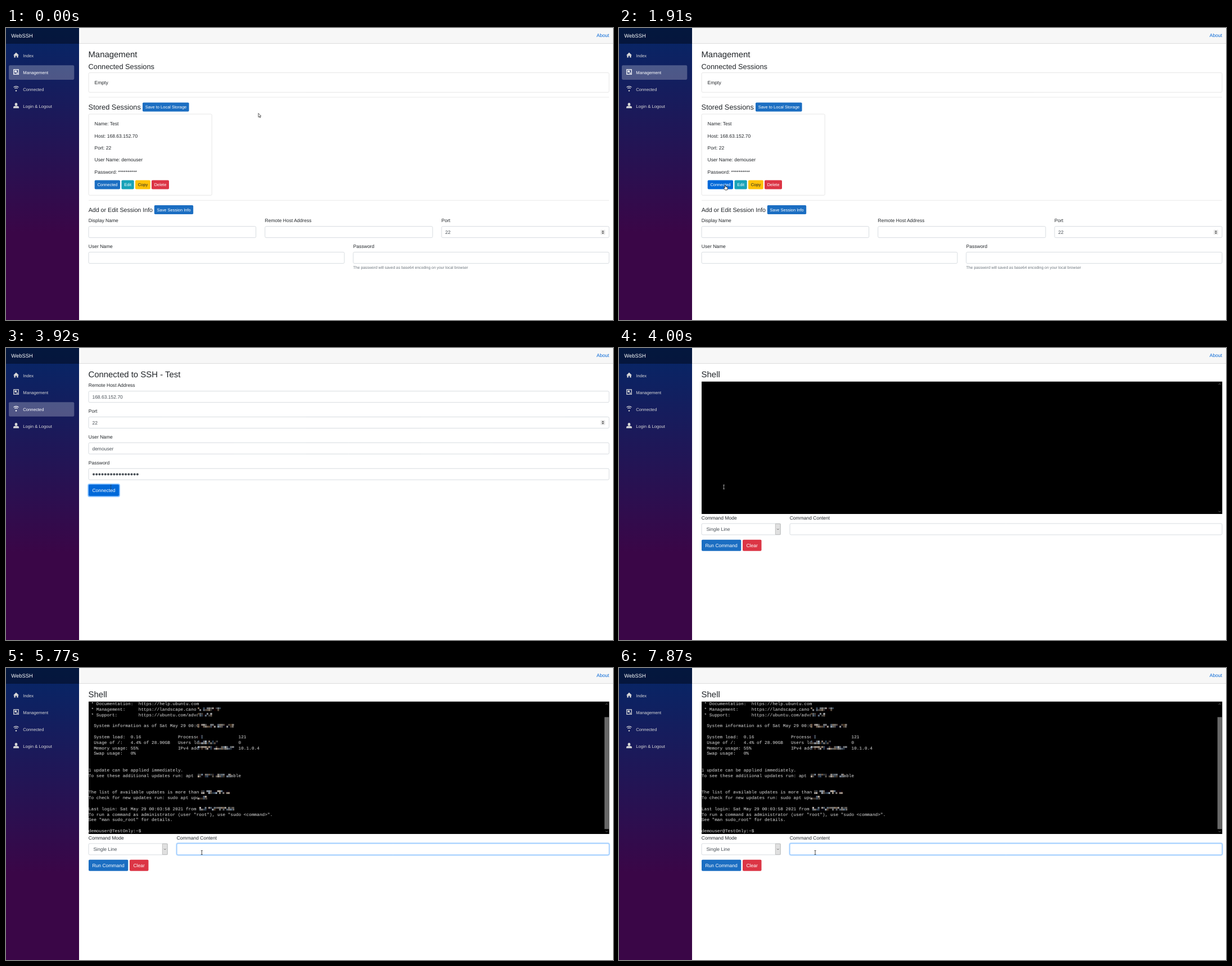
Recreate the animation shown at these times as an HTML page with a canvas. Size 1080 by 519 pixels, loop 8000 ms.

```html
<!DOCTYPE html>
<html lang="en">
<head>
<meta charset="utf-8">
<title>WebSSH</title>
<style>
html, body { margin: 0; width: 100%; height: 100%; overflow: hidden; background: #fff; }
canvas { display: block; width: 1080px; height: 519px; }
</style>
</head>
<body>
<canvas id="stage"></canvas>
<script>
const W = 1080, H = 519, LOOP = 8000;
const canvas = document.getElementById('stage');
const ratio = window.devicePixelRatio || 1;
canvas.width = W * ratio;
canvas.height = H * ratio;
const c = canvas.getContext('2d');
c.scale(ratio, ratio);
c.textRendering = 'geometricPrecision';

const SANS = '"Liberation Sans", Arial, sans-serif';
const MONO = '"Liberation Mono", "Courier New", monospace';
const BODY = 8.53, SMALL = 7.47, H3 = 14.93, H4 = 12.8, H5 = 10.67;
const INK = '#212529', FIELD = '#495057', BLUE = '#1b6ec2', HOVER = '#0069d9', RED = '#dc3545';
const LEFT = 147, RIGHT = 1073;

// Times at which the scene switches
const T = { form: 1980, press: 2760, beam: 3920, shell: 4000, output: 5080, focus: 5230 };

// Text is placed by the middle of its capitals
function text(s, x, y, size = BODY, color = INK, family = SANS) {
  c.font = `${size}px ${family}`;
  c.fillStyle = color;
  c.fillText(s, x, y + size * 0.358);
}

function rect(x, y, x2, y2, color) {
  c.fillStyle = color;
  c.fillRect(x, y, x2 - x, y2 - y);
}

function rounded(x, y, x2, y2, r, fill, stroke, width = 1) {
  c.beginPath();
  c.roundRect(x, y, x2 - x, y2 - y, r);
  if (fill) { c.fillStyle = fill; c.fill(); }
  if (stroke) { c.strokeStyle = stroke; c.lineWidth = width; c.stroke(); }
}

function poly(points, fill, stroke, width = 1) {
  c.beginPath();
  points.forEach(([x, y]) => c.lineTo(x, y));
  if (fill) { c.closePath(); c.fillStyle = fill; c.fill(); }
  if (stroke) { c.strokeStyle = stroke; c.lineWidth = width; c.stroke(); }
}

function card(x, y, x2, y2) {
  rounded(x, y, x2, y2, 2, '#fff', '#e4e4e4', 0.9);
}

function input(x, y, x2, value = '', focused = false) {
  if (focused) rounded(x - 0.7, y - 0.7, x2 + 0.7, y + 20.7, 2.6, null, '#bfdeff', 1.9);
  rounded(x, y, x2, y + 20, 2.1, '#fff', focused ? '#80bdff' : '#d3d8dd', 0.9);
  text(value, x + 6.4, y + 10.2, BODY, FIELD);
}

function spinner(y) {
  rect(1058, y - 4.2, 1066, y + 4.2, '#e6e6e6');
  poly([[1060, y - 0.8], [1062, y - 3], [1064, y - 0.8]], '#444');
  poly([[1060, y + 0.8], [1062, y + 3], [1064, y + 0.8]], '#444');
}

function button(label, x, y, x2, y2, fill, size, color = '#fff') {
  rounded(x, y, x2, y2, 1.8, fill);
  text(label, x + (size === SMALL ? 4.7 : 6.4), (y + y2) / 2 + 0.1, size, color);
}

function rule(y) { rect(LEFT, y - 0.5, RIGHT, y + 0.5, '#e9e9e9'); }

// ---- Frame around the pages ----
const icons = [
  (x, y) => {
    poly([[x, y + 5], [x + 5, y], [x + 10, y + 5], [x + 8.6, y + 5], [x + 8.6, y + 9],
      [x + 6.2, y + 9], [x + 6.2, y + 6], [x + 3.8, y + 6], [x + 3.8, y + 9], [x + 1.4, y + 9], [x + 1.4, y + 5]], c.fillStyle);
  },
  (x, y) => {
    c.lineWidth = 1.3;
    c.strokeRect(x + 0.8, y + 0.5, 8.4, 8.4);
    c.beginPath();
    c.arc(x + 4.3, y + 3.9, 1.9, 0, 7);
    c.fill();
    c.fillRect(x + 5.8, y + 6, 2, 1.6);
  },
  (x, y) => {
    c.lineWidth = 1.2;
    [[6.8, 0.72], [4, 0.72]].forEach(([r, a]) => {
      c.beginPath();
      c.arc(x + 5, y + 7.2, r, -Math.PI / 2 - a, -Math.PI / 2 + a);
      c.stroke();
    });
    c.beginPath();
    c.arc(x + 5, y + 8.2, 1.2, 0, 7);
    c.fill();
  },
  (x, y) => {
    c.beginPath();
    c.ellipse(x + 5, y + 2.7, 2.3, 2.8, 0, 0, 7);
    c.fill();
    c.beginPath();
    c.roundRect(x, y + 5.7, 10, 3.6, [2.5, 2.5, 0, 0]);
    c.fill();
  }
];

function chrome(active) {
  rect(0, 0, W, H, '#fff');
  const g = c.createLinearGradient(0, 0, 0, H);
  g.addColorStop(0, 'rgb(5,39,103)');
  g.addColorStop(0.7, '#3a0647');
  rect(0, 0, 130, H, g);
  rect(0, 0, 130, 28, 'rgba(0,0,0,.4)');
  text('WebSSH', 9.3, 13.5, 9.39, '#fff');
  ['Index', 'Management', 'Connected', 'Login & Logout'].forEach((name, i) => {
    const y = 49.2 + i * 29.87, on = i === active;
    if (on) rounded(5, y - 12.7, 121.3, y + 12.9, 2.1, 'rgba(255,255,255,.25)');
    const color = on ? '#fff' : '#d7d7d7';
    c.fillStyle = c.strokeStyle = color;
    icons[i](13, y - 5.7);
    text(name, 30.3, y + 0.1, 7.68, color);
  });
  rect(130, 0, W, 27.5, '#f7f7f7');
  rect(130, 27, W, 28, '#dcdcdc');
  text('About', 1050.8, 13.3, BODY, '#0366d6');
}

// ---- Pages ----
function managementPage(p) {
  text('Management', LEFT - 0.6, 46.7, H3);
  text('Connected Sessions', LEFT - 0.4, 68, H4);
  card(LEFT, 79.5, RIGHT, 114.3);
  text('Empty', 157.5, 97);
  rule(123);
  text('Stored Sessions', LEFT - 0.4, 140, H4);
  button('Save to Local Storage', 243, 132.4, 325.6, 148.5, BLUE, SMALL);
  card(LEFT, 153, 366.3, 297.3);
  ['Name: Test', 'Host: 168.63.152.70', 'Port: 22', 'User Name: demouser', 'Password: **********']
    .forEach((s, i) => text(s, 157.5, 170.4 + i * 21.3));
  [
    ['Connected', 157.7, 203, BLUE, HOVER],
    ['Edit', 205.5, 227.7, '#17a2b8', '#138496'],
    ['Copy', 230, 256.8, '#ffc107', '#e0a800', INK],
    ['Delete', 259, 290, RED, '#c82333']
  ].forEach(([label, x, x2, fill, hover, color]) => {
    const over = p.x > x && p.x < x2 && p.y > 270.5 && p.y < 286.5;
    if (over) p.kind = hand;
    button(label, x, 270.4, x2, 286.5, over ? hover : fill, SMALL, color);
  });
  rule(306.3);
  text('Add or Edit Session Info', LEFT - 0.3, 323, H5);
  button('Save Session Info', 263.8, 315, 333.2, 331, BLUE, SMALL);
  text('Display Name', LEFT - 0.2, 342);
  text('Remote Host Address', 460.6, 342);
  text('Port', 774.8, 342);
  input(LEFT, 352.6, 444.7);
  input(460.8, 352.6, 759);
  input(775, 352.6, RIGHT, '22');
  spinner(363);
  text('User Name', LEFT - 0.2, 388);
  text('Password', 617.8, 388);
  input(LEFT, 398.4, 602);
  input(617.8, 398.4, RIGHT);
  text('The password will saved as base64 encoding on your local browser', 617.8, 426, 6.83, '#6c757d');
}

function connectPage(t, p) {
  text('Connected to SSH - Test', LEFT - 0.6, 46.7, H3);
  [['Remote Host Address', '168.63.152.70'], ['Port', '22'], ['User Name', 'demouser'], ['Password', '']]
    .forEach(([label, value], i) => {
      const y = 66.2 + i * 45.85;
      text(label, LEFT - 0.2, y);
      input(LEFT, y + 10.5, RIGHT, value);
    });
  spinner(132.5);
  c.fillStyle = FIELD;
  for (let i = 0; i < 16; i++) {
    c.beginPath();
    c.arc(156 + i * 5.19, 224.5, 2, 0, 7);
    c.fill();
  }
  const over = p.y < 263;
  if (over) p.kind = t < T.beam ? hand : beam;
  const ring = Math.max(0, Math.min(1, (t - T.press + 60) / 230));
  if (ring) rounded(146.2, 242.1, 202, 263.9, 2.6, null, `rgba(38,143,255,${ring * 0.55})`, 2);
  button('Connected', LEFT, 242.8, 201.2, 263, over ? HOVER : BLUE, BODY);
}

const lines = [
  ' * Documentation:  https://help.ubuntu.com',
  ' * Management:     https://landscape.cano',
  ' * Support:        https://ubuntu.com/adva',
  '',
  '  System information as of Sat May 29 00:0',
  '',
  '  System load:  0.16              Processes              121',
  '  Usage of /:   4.4% of 28.90GB   Users lo               0',
  '  Memory usage: 55%               IPv4 add               10.1.0.4',
  '  Swap usage:   0%',
  '', '',
  '1 update can be applied immediately.',
  'To see these additional updates run: apt              able',
  '', '',
  'The list of available updates is more than',
  'To check for new updates run: sudo apt upd',
  '',
  'Last login: Sat May 29 00:03:58 2021 from',
  'To run a command as administrator (user "root"), use "sudo <command>".',
  'See "man sudo_root" for details.',
  '',
  'demouser@TestOnly:~$'
];

// Pixelated stretches: line, left, right
const blurs = [[1, 341, 382], [2, 341, 367], [4, 341, 406], [6, 341, 350], [7, 341, 377], [8, 341, 406],
  [13, 341, 400], [16, 347, 400], [17, 341, 358], [19, 344, 406]];

function mosaic(row, x1, x2) {
  const y = 60.2 + row * 9.826, size = 3.2;
  let seed = row * 7919 + 17;
  const rnd = () => (seed = (seed * 16807) % 2147483647) / 2147483647;
  rnd();
  rect(x1, y - 1, x2, y + 8, '#000');
  for (let x = x1; x < x2; x += size) {
    for (let j = 0; j < 2; j++) {
      const v = rnd() < 0.38 ? 0 : 45 + rnd() * 135, tint = (rnd() - 0.5) * 40;
      rect(x, y + j * size, Math.min(x + size, x2), y + (j + 1) * size, `rgb(${v + tint},${v},${v - tint})`);
    }
  }
}

function terminal(t) {
  rect(LEFT, 59.7, RIGHT + 0.3, 295, '#000');
  const ready = t >= T.output;
  if (ready) {
    c.save();
    c.beginPath();
    c.rect(LEFT, 60, RIGHT - LEFT, 235);
    c.clip();
    lines.forEach((s, i) => text(s, LEFT - 0.2, 63.2 + i * 9.826, 7.8, '#dcdcdc', MONO));
    blurs.forEach(b => mosaic(...b));
    c.restore();
    rect(1064.8, 87.3, 1072.8, 286.3, '#686868');
  }
  poly([[1066.8, 65.2], [1068.8, 63.2], [1070.8, 65.2]], null, '#777', 0.9);
  poly([[1066.8, 289.6], [1068.8, 291.6], [1070.8, 289.6]], null, '#777', 0.9);
}

function shellPage(t, p) {
  text('Shell', LEFT - 0.4, 46.7, H3);
  terminal(t);
  text('Command Mode', LEFT - 0.2, 301.7);
  text('Command Content', 303.7, 301.7);
  input(LEFT, 312, 287.5);
  text('Single Line', 155.4, 322.2, BODY, FIELD);
  rounded(278.3, 312.5, 287.2, 331.5, 0, '#e0e0e0', '#b5b5b5', 0.8);
  poly([[281.1, 321.3], [282.8, 323], [284.5, 321.3]], null, '#555', 0.8);

  const typed = t < 7100 || t >= 7720 ? '' : t < 7180 ? 'l' : 'ls';
  input(304, 312, RIGHT, typed, t >= T.focus);
  const caretOn = [[T.focus, 5620], [6230, 6780], [7100, 7320], [7720, 7870]].some(([a, b]) => t >= a && t < b);
  if (caretOn) {
    const x = 310 + [0, 2, 6][typed.length];
    rect(x, 317, x + 1, 327, '#555');
  }
  button('Run Command', LEFT, 340.7, 217.3, 360.7, BLUE, BODY);
  button('Clear', 220, 340.7, 253.5, 360.7, RED, BODY);
  p.kind = beam;
}

// ---- Pointer ----
function arrow(x, y) {
  poly([[x, y], [x, y + 7], [x + 1.6, y + 5.5], [x + 2.8, y + 8], [x + 3.8, y + 7.5],
    [x + 2.7, y + 5.2], [x + 4.8, y + 5]], '#fff', '#333', 0.8);
}

function hand(x, y) {
  poly([[x - 0.8, y + 0.2], [x + 0.7, y + 0.2], [x + 0.9, y + 2.6], [x + 4, y + 3.4], [x + 4.4, y + 5],
    [x + 3.5, y + 8.4], [x - 0.3, y + 8.4], [x - 3, y + 5], [x - 2.4, y + 4.3], [x - 0.9, y + 5]], '#fff', '#111', 0.8);
}

function beam(x, y, t) {
  const onBlack = t >= T.shell && y < 295;
  c.globalAlpha = t < T.shell ? 0.55 : 1;
  const color = onBlack ? '#b0b0b0' : '#333';
  rect(x - 0.4, y - 4.4, x + 0.5, y + 2.4, color);
  rect(x - 1.5, y - 4.8, x + 1.6, y - 4, color);
  rect(x - 1.5, y + 2, x + 1.6, y + 2.8, color);
  c.globalAlpha = 1;
}

// Start, end, steps, then the place reached
const moves = [
  [500, 1280, 11, 219, 268],
  [1360, 1910, 8, 189, 279.5],
  [2380, 2600, 4, 186.5, 248],
  [4310, 4930, 9, 351, 317.5],
  [5460, 5770, 5, 348.3, 329],
  [5930, 6230, 5, 349, 329]
];

function pointer(t) {
  let x = 449, y = 151.5;
  for (const [t0, t1, n, x1, y1] of moves) {
    if (t < t0) break;
    const step = Math.min(n, Math.floor((t - t0) / (t1 - t0) * (n - 1) + 0.001) + 1);
    const k = step / n, e = k * k * (3 - 2 * k);
    x += (x1 - x) * e;
    y += (y1 - y) * e;
  }
  return { x, y, kind: arrow };
}

function draw(t) {
  const p = pointer(t);
  chrome(t < T.form ? 1 : t < T.shell ? 2 : -1);
  if (t < T.form) managementPage(p);
  else if (t < T.shell) connectPage(t, p);
  else shellPage(t, p);
  p.kind(p.x, p.y, t);
}

const start = performance.now();
function tick() {
  draw((performance.now() - start) % LOOP);
  requestAnimationFrame(tick);
}
tick();
</script>
</body>
</html>
```
